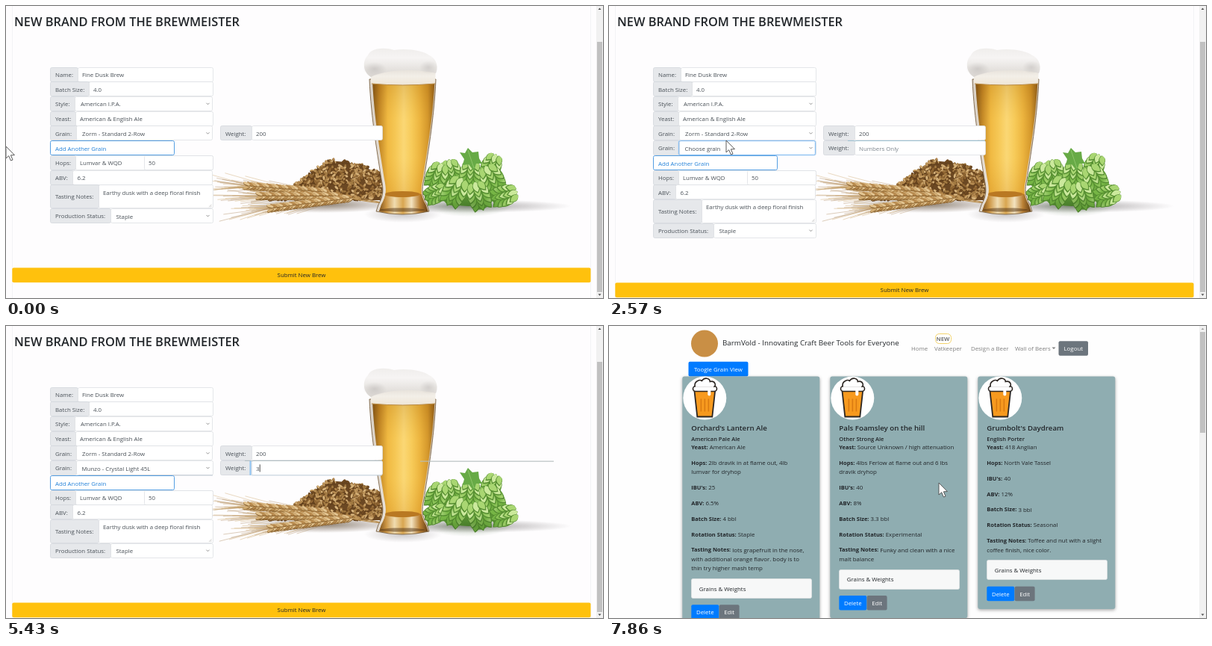
Animation, 800 px wide and 391 px high, one loop 8000 ms. Source, as an HTML page with a canvas:

```html
<!DOCTYPE html>
<html lang="en">
<head>
<meta charset="utf-8">
<title>Brew form</title>
<style>
html, body { margin: 0; width: 100%; height: 100%; overflow: hidden; background: #fff; }
canvas { display: block; width: 800px; height: 391px; }
</style>
</head>
<body>
<canvas id="stage"></canvas>
<script>
const W = 800, H = 391, LOOP = 8000, STEP = 1000 / 7;
const FONT = '"Open Sans", "Noto Sans", sans-serif';
const BODY = 7.85, ROW = 19.72;
const dpr = window.devicePixelRatio || 1;

function setup(canvas) {
  canvas.width = W * dpr;
  canvas.height = H * dpr;
  const c = canvas.getContext('2d');
  c.scale(dpr, dpr);
  return c;
}
const g = setup(document.getElementById('stage'));

// ---------- helpers ----------
function text(s, x, y, color = '#495057', size = BODY, weight = 400, align = 'left') {
  g.font = `${weight} ${size}px ${FONT}`;
  g.fillStyle = color;
  g.textAlign = align;
  g.fillText(s, x, y + size * 0.357);
  return g.measureText(s).width;
}

function box(x, y, w, h, fill, stroke, r = 2, line = 0.8) {
  if (stroke) {
    x = Math.floor(x) + 0.5;
    y = Math.floor(y) + 0.5;
    w = Math.round(w);
    h = Math.round(h);
  }
  g.beginPath();
  g.roundRect(x, y, w, h, r);
  if (fill) { g.fillStyle = fill; g.fill(); }
  if (stroke) { g.strokeStyle = stroke; g.lineWidth = line; g.stroke(); }
}

function rect(x, y, w, h, fill) {
  g.fillStyle = fill;
  g.fillRect(x, y, w, h);
}

function poly(c, points, fill, stroke, line = 1) {
  c.beginPath();
  points.forEach(([x, y]) => c.lineTo(x, y));
  c.closePath();
  if (fill) { c.fillStyle = fill; c.fill(); }
  if (stroke) { c.strokeStyle = stroke; c.lineWidth = line; c.stroke(); }
}

function oval(c, x, y, rx, ry, a, fill) {
  c.beginPath();
  c.ellipse(x, y, rx, ry, a, 0, Math.PI * 2);
  c.fillStyle = fill;
  c.fill();
}

function ramp(c, x0, y0, x1, y1, colors) {
  const grad = c.createLinearGradient(x0, y0, x1, y1);
  colors.forEach((col, i) => grad.addColorStop(i / (colors.length - 1), col));
  return grad;
}

function seeded(seed) {
  return () => (seed = (seed * 16807) % 2147483647) / 2147483647;
}

// ---------- background picture ----------
function softShadow(c, x, y, rx, ry, alpha, rgb = '80,75,75') {
  c.save();
  c.translate(x, y);
  c.scale(rx, ry);
  const grad = c.createRadialGradient(0, 0, 0, 0, 0, 1);
  grad.addColorStop(0, `rgba(${rgb},${alpha})`);
  grad.addColorStop(1, `rgba(${rgb},0)`);
  c.fillStyle = grad;
  c.fillRect(-1, -1, 2, 2);
  c.restore();
}

function pileTop(x) {
  const spread = x < 440 ? 50 : 95;
  return 255 - 49 * Math.exp(-(((x - 440) / spread) ** 2));
}

function drawPile(c, rnd) {
  const colors = ['#b58a50', '#8f6532', '#d6b27a', '#6f4a22', '#c39a5f', '#a27a42'];
  const hill = [[360, 260]];
  for (let x = 360; x <= 510; x += 6) hill.push([x, pileTop(x) + 2]);
  hill.push([510, 260]);
  poly(c, hill, '#6b4823');
  const grains = [];
  for (let i = 0; i < 700; i++) {
    const x = 352 + rnd() * 158, top = pileTop(x);
    grains.push([x, top + rnd() * (258 - top), rnd() * 3, colors[Math.floor(rnd() * 6)]]);
  }
  grains.sort((a, b) => a[1] - b[1]);
  for (const [x, y, a, col] of grains) {
    oval(c, x, y + 0.8, 3.3, 1.8, a, '#5f3e1c');
    oval(c, x, y, 3.1, 1.5, a, col);
  }
}

function drawEar(c, rnd, x1, y1, x2, y2) {
  const a = Math.atan2(y2 - y1, x2 - x1), n = 26;
  const colors = ['#d2ad74', '#b88a4e', '#e3c592'];
  const at = u => [x1 + (x2 - x1) * u, y1 + (y2 - y1) * u];
  c.strokeStyle = '#b98f52';
  c.lineWidth = 1.2;
  c.beginPath();
  c.moveTo(508, 264);
  c.quadraticCurveTo((x1 + 508) / 2, y1 + 6, x1, y1);
  c.stroke();
  c.lineWidth = 0.6;
  for (let i = 0; i < n * 2; i++) {
    const [x, y] = at(i / n / 2);
    const d = a + (rnd() - 0.5) * 0.4, len = 40 + rnd() * 35;
    c.strokeStyle = i % 2 ? 'rgba(205,166,106,.7)' : 'rgba(160,118,66,.6)';
    c.beginPath();
    c.moveTo(x, y);
    c.lineTo(x + Math.cos(d) * len, y + Math.sin(d) * len);
    c.stroke();
  }
  for (let i = 0; i < n; i++) {
    const [x, y] = at(i / n);
    for (const s of [-1, 1]) {
      const kx = x - Math.sin(a) * 2.5 * s, ky = y + Math.cos(a) * 2.5 * s;
      oval(c, kx, ky + 0.7, 5, 2.1, a + 0.4 * s, '#8c6532');
      oval(c, kx, ky, 4.8, 1.7, a + 0.4 * s, colors[(i + s + 3) % 3]);
    }
  }
}

function bract(c, x, y, w, h, a, fill) {
  c.save();
  c.translate(x, y);
  c.rotate(a);
  c.beginPath();
  c.moveTo(0, h);
  c.quadraticCurveTo(-w * 1.5, -h * 0.2, 0, -h);
  c.quadraticCurveTo(w * 1.5, -h * 0.2, 0, h);
  c.fillStyle = fill;
  c.fill();
  c.restore();
}

function drawCone(c, x, y, r, a) {
  c.save();
  c.translate(x, y);
  c.rotate(a);
  oval(c, 0, 0, r * 0.92, r * 1.05, 0, '#5f9a38');
  for (let j = 0; j < 5; j++) {
    const yy = (0.7 - j * 0.36) * r;
    const half = Math.sqrt(1 - (yy / r / 1.1) ** 2) * r * 0.62;
    for (let k = -1; k <= 1; k++) {
      const tilt = -k * 0.45;
      bract(c, k * half, yy, r * 0.4, r * 0.48, tilt, '#548c30');
      bract(c, k * half, yy - 0.8, r * 0.33, r * 0.42, tilt, ramp(c, 0, yy - r * 0.4, 0, yy + r * 0.4, ['#76b545', (j + k) % 2 ? '#a9d672' : '#cbe99c']));
    }
  }
  c.restore();
}

function drawHops(c) {
  oval(c, 620, 242, 48, 26, 0, '#5a9436');
  const cones = [[650, 215, 15, 0.4], [597, 223, 15, -0.2], [577, 228, 16, 0.4], [622, 226, 16, 0.1],
    [652, 232, 17, -0.5], [575, 252, 14, 1.1], [601, 249, 18, 0.5], [667, 254, 16, 1.3], [634, 255, 17, -0.3]];
  cones.forEach(p => drawCone(c, ...p));
  softShadow(c, 620, 268, 58, 14, 0.3, '30,70,15');
  poly(c, [[608, 196], [615, 197], [619, 190], [625, 196], [633, 195], [634, 204], [638, 211],
    [630, 211], [627, 221], [620, 212], [612, 213], [614, 205]], '#67aa46');
  c.strokeStyle = '#9bd077';
  c.lineWidth = 0.7;
  c.beginPath();
  c.moveTo(619, 193);
  c.lineTo(627, 217);
  c.stroke();
}

// inset moves the two sides inwards
function glassPath(c, left = 0, right = 0) {
  c.beginPath();
  c.moveTo(487 + left, 98);
  c.bezierCurveTo(489 + left, 150, 499 + left, 205, 503 + left, 232);
  c.bezierCurveTo(506 + left, 246, 506 + left, 254, 499 + left, 266);
  c.lineTo(496 + left, 275);
  c.quadraticCurveTo(531, 283, 567 - right, 275);
  c.lineTo(564 - right, 266);
  c.bezierCurveTo(557 - right, 254, 557 - right, 246, 560 - right, 232);
  c.bezierCurveTo(564 - right, 205, 574 - right, 150, 576 - right, 98);
  c.closePath();
}

function drawFoam(c) {
  c.beginPath();
  c.moveTo(489, 80);
  c.lineTo(576, 80);
  c.lineTo(575, 104);
  c.quadraticCurveTo(531, 108, 489, 104);
  c.closePath();
  c.fillStyle = ramp(c, 0, 82, 0, 106, ['#e2ddd6', '#f3efe8', '#eee5d6']);
  c.fill();
  c.beginPath();
  c.moveTo(489, 95);
  c.bezierCurveTo(477, 88, 478, 72, 485, 66);
  c.bezierCurveTo(489, 56, 507, 55, 520, 59);
  c.bezierCurveTo(537, 56, 560, 60, 567, 66);
  c.bezierCurveTo(579, 71, 579, 85, 576, 90);
  c.bezierCurveTo(550, 84, 510, 84, 489, 95);
  c.fillStyle = ramp(c, 0, 57, 0, 94, ['#f0eeec', '#f6f4f3', '#e9e6e3', '#d9d5d1']);
  c.fill();
  softShadow(c, 494, 84, 16, 9, 0.16);
  softShadow(c, 566, 82, 12, 9, 0.14);
}

function drawGlass(c) {
  glassPath(c);
  c.fillStyle = ramp(c, 487, 0, 576, 0, ['#d8cfc4', '#efe9e1', '#eee6da', '#cdbda8']);
  c.fill();
  c.save();
  glassPath(c, 4, 1.5);
  c.clip();
  c.fillStyle = ramp(c, 490, 0, 576, 0, ['#6e430f', '#bd7f1f', '#eeb53d', '#f5c654', '#fad777', '#f6c957', '#eab03a', '#cf8f24', '#7d4d12']);
  c.fillRect(480, 95, 100, 190);
  c.fillStyle = ramp(c, 0, 100, 0, 255, ['rgba(150,90,10,.22)', 'rgba(255,215,100,.12)', 'rgba(255,215,100,.12)', 'rgba(190,110,10,.2)']);
  c.fillRect(480, 95, 100, 160);
  c.fillStyle = ramp(c, 498, 0, 566, 0, ['#6b4418', '#cb9442', '#f0dcb0', '#d9a650', '#f3e3c0', '#ba8034', '#5f3b14']);
  c.fillRect(480, 252, 100, 32);
  oval(c, 531, 252, 24, 4, 0, '#b97822');
  oval(c, 531, 273, 30, 2.6, 0, 'rgba(80,50,20,.5)');
  c.restore();
  glassPath(c);
  c.strokeStyle = '#7b6245';
  c.lineWidth = 0.9;
  c.stroke();
  drawFoam(c);
  c.strokeStyle = '#b98a45';
  c.lineWidth = 1;
  c.beginPath();
  c.moveTo(490, 104);
  c.quadraticCurveTo(531, 108, 575, 104);
  c.stroke();
}

function makePicture() {
  const canvas = document.createElement('canvas');
  const c = setup(canvas), rnd = seeded(77);
  softShadow(c, 620, 268, 138, 9, 0.5);
  softShadow(c, 532, 279, 52, 11, 0.3);
  softShadow(c, 425, 266, 100, 11, 0.6, '70,48,25');
  drawPile(c, rnd);
  drawEar(c, rnd, 430, 249, 318, 240);
  drawEar(c, rnd, 445, 254, 335, 254);
  drawEar(c, rnd, 460, 257, 350, 271);
  drawHops(c);
  drawGlass(c);
  return canvas;
}
const picture = makePicture();

// ---------- pointers ----------
function arrow(x, y) {
  const pts = [[0, 0], [0, 16], [3.7, 12.7], [6.4, 19], [9, 18], [6.4, 11.8], [11.4, 11.6]];
  poly(g, pts.map(([a, b]) => [x + a, y + b]), '#fff', '#4a4a4a', 0.9);
}

function hand(x, y) {
  g.beginPath();
  g.moveTo(x - 1.8, y + 13);
  g.lineTo(x - 1.8, y + 1.5);
  g.quadraticCurveTo(x, y - 1, x + 1.8, y + 1.5);
  g.lineTo(x + 1.8, y + 7);
  g.quadraticCurveTo(x + 4, y + 5.5, x + 5, y + 8);
  g.quadraticCurveTo(x + 7, y + 6.5, x + 8, y + 9);
  g.quadraticCurveTo(x + 10, y + 8, x + 10, y + 11);
  g.lineTo(x + 9.6, y + 16);
  g.lineTo(x + 8, y + 21);
  g.lineTo(x, y + 21);
  g.lineTo(x - 5, y + 13.5);
  g.quadraticCurveTo(x - 5, y + 10, x - 1.8, y + 13);
  g.closePath();
  g.fillStyle = '#fff';
  g.fill();
  g.strokeStyle = '#222';
  g.lineWidth = 0.9;
  g.stroke();
}

function ibeam(x, y) {
  rect(x - 0.4, y - 7, 0.9, 14, '#333');
  rect(x - 2.5, y - 7, 5, 0.8, '#333');
  rect(x - 2.5, y + 6.5, 5, 0.8, '#333');
}

// time, x, y
const PATH = [[0, 0, 188], [860, 79, 190], [1290, 80, 190], [2150, 157, 180], [3569, 157, 180],
  [3570, 160, 266], [3710, 164, 273], [3990, 164, 273], [4430, 387, 207], [4850, 374, 190],
  [6270, 374, 190], [7000, 350, 376], [7420, 350, 376], [7860, 442, 210], [8000, 442, 210]];

function pointerAt(t) {
  const i = Math.max(1, PATH.findIndex(p => p[0] >= t));
  const [t0, x0, y0] = PATH[i - 1], [t1, x1, y1] = PATH[i];
  const u = (t - t0) / (t1 - t0), e = u * u * (3 - 2 * u);
  return [x0 + (x1 - x0) * e, y0 + (y1 - y0) * e];
}

// ---------- form page ----------
function label(x, y, w, s, h = 19.2) {
  box(x, y, w, h, '#e6e8eb', '#d3d7dc');
  text(s, x + 7, y + h / 2 + 0.4);
}

function input(x, y, w, s, color, h = 19.2) {
  box(x, y, w, h, '#fff', '#dde0e4');
  text(s, x + 6, y + 10.2, color);
}

function select(x, y, w, s) {
  box(x, y, w, 19.2, '#fff', '#dde0e4');
  text(s, x + 7.5, y + 10.2);
  g.strokeStyle = '#777';
  g.lineWidth = 0.8;
  g.beginPath();
  g.moveTo(x + w - 8, y + 8.4);
  g.lineTo(x + w - 6, y + 10.4);
  g.lineTo(x + w - 4, y + 8.4);
  g.stroke();
}

function field(y, name, w, draw, s) {
  label(59, y, w, name);
  draw(59 + w, y, 217.5 - w, s);
}

function scrollbar(top, bottom, atTop) {
  rect(791, 0, 9, H, '#f1f1f1');
  rect(792, top, 7, bottom - top, '#c1c1c1');
  poly(g, [[793.5, 5], [795.5, 2.5], [797.5, 5]], atTop ? '#a3a3a3' : '#505050');
  poly(g, [[793.5, 385.5], [795.5, 388], [797.5, 385.5]], '#505050');
}

function formPage(t, px, py) {
  const added = t >= 1280, picked = t >= 3420;
  const grainFocus = t >= 2280 && t < 4850, weightFocus = t >= 4850;
  const typed = t < 5280 ? '' : t < 5700 ? '3' : '35';

  rect(0, 0, W, H, '#fefdfe');
  rect(8, 0, 0.8, H, '#f0f0f3');
  rect(783.2, 0, 0.8, H, '#f0f0f3');
  text('NEW BRAND FROM THE BREWMEISTER', 11, 20.9, '#212529', 16.38, 600);
  g.drawImage(picture, 0, 0, W, H);
  if (weightFocus) rect(555, 180.6, 179, 1.1, '#b4bdbd');

  let y = 82;
  field(y, 'Name:', 37, input, 'Fine Dusk Brew');
  field(y += ROW, 'Batch Size:', 52, input, '4.0');
  field(y += ROW, 'Style:', 33.5, select, 'American I.P.A.');
  field(y += ROW, 'Yeast:', 34, input, 'American & English Ale');
  field(y += ROW, 'Grain:', 35.5, select, 'Zorm - Standard 2-Row');
  label(287, y, 42, 'Weight:');
  input(329, y, 175, '200');

  if (added) {
    field(y += ROW, 'Grain:', 35, select, picked ? 'Munzo - Crystal Light 45L' : 'Choose grain');
    label(287, y, 42, 'Weight:');
    input(329, y, 175, typed || 'Numbers Only', typed ? '#495057' : '#7c858d');
    rect(320, 180, 184, 1, weightFocus ? '#b3bfc3' : '#9fc3d3');
    if (grainFocus) {
      box(93, y, 183, 19.2, null, 'rgba(0,123,255,.14)', 2, 2.2);
      box(93, y, 183, 19.2, null, '#84bdf0', 2, 0.9);
    }
    if (weightFocus) {
      rect(97, 199.5, 180, 0.9, '#b3c0cb');
      rect(329, 199.5, 175, 0.9, '#c2d3df');
      rect(326.5, y, 2, 19.2, '#8fc3f2');
      const blink = t < 5700 || Math.floor((t - 5700) / 500) % 2 === 0;
      if (blink) {
        g.font = `400 ${BODY}px ${FONT}`;
        rect(335.3 + g.measureText(typed).width, y + 4.8, 0.8, 10, '#222');
      }
    }
  }

  y += ROW;
  const hot = !added && px > 59 && px < 226 && py > y && py < y + 19.5;
  box(59, y, 166, 19.2, hot ? '#007bff' : '#fff', hot ? '#007bff' : '#559fe2', 2, 1);
  text('Add Another Grain', 66, y + 10.4, hot ? '#fff' : '#1f7fd8');

  field(y += ROW, 'Hops:', 34, input, 'Lumvar & WQD');
  input(185, y, 91.5, '50');
  field(y += ROW, 'ABV:', 30.5, input, '6.2');
  y += ROW;
  label(59, y, 65, 'Tasting Notes:', 31);
  input(124, y, 152.5, 'Earthy dusk with a deep floral finish', undefined, 31);
  g.strokeStyle = '#aaa';
  g.lineWidth = 0.6;
  g.beginPath();
  g.moveTo(272, y + 29.5);
  g.lineTo(275.5, y + 26);
  g.moveTo(274, y + 29.5);
  g.lineTo(275.5, y + 28);
  g.stroke();
  field(y += 31.8, 'Production Status:', 81, select, 'Staple');

  const sy = added ? 370.4 : 350.4;
  const over = added && py > sy;
  box(8.3, sy, 775.2, 19.9, !over ? '#ffc10d' : t >= 7420 ? '#d39e00' : '#e0a80a', null, 2);
  text('Submit New Brew', 396, sy + 10.2, '#212529', BODY, 400, 'center');

  scrollbar(48, 383, false);
  if (t >= 5130 && t < 6270) return;
  if (hot || over) hand(px, py);
  else if (t > 4430 && t < 6500 && px > 329 && py < 200 && py > 162) ibeam(px, py);
  else arrow(px, py);
}

// ---------- list page ----------
const CARDS = [
  ["Orchard's Lantern Ale", 'American Pale Ale', ['Yeast: American Ale'],
    ['Hops: 2lb dravik in at flame out, 4lb', 'lumvar for dryhop'],
    ["IBU's: 25"], ['ABV: 6.5%'], ['Batch Size: 4 bbl'], ['Rotation Status: Staple'],
    ['Tasting Notes: lots grapefruit in the nose,', 'with additional orange flavor. body is to', 'thin try higher mash temp']],
  ['Pals Foamsley on the hill', 'Other Strong Ale', ['Yeast: Source Unknown / high attenuation'],
    ['Hops: 4lbs Ferlow at flame out and 6 lbs', 'dravik dryhop'],
    ["IBU's: 40"], ['ABV: 8%'], ['Batch Size: 3.3 bbl'], ['Rotation Status: Experimental'],
    ['Tasting Notes: Funky and clean with a nice', 'malt balance']],
  ["Grumbolt's Daydream", 'English Porter', ['Yeast: 418 Anglian'], ['Hops: North Vale Tassel'],
    ["IBU's: 40"], ['ABV: 12%'], ['Batch Size: 3 bbl'], ['Rotation Status: Seasonal'],
    ['Tasting Notes: Toffee and nut with a slight', 'coffee finish, nice color.']]
];
const INK = '#212529';

function pint(x, y) {
  oval(g, x, y, 29, 29, 0, '#fff');
  const dark = '#2c2622';
  poly(g, [[x - 14, y - 11], [x + 14, y - 11], [x + 10, y + 25], [x - 10, y + 25]], '#f79a1f', dark, 1.8);
  for (const d of [-5, 0, 5]) rect(x + d - 0.7, y + 1, 1.5, 17, '#d97a12');
  box(x - 16, y - 16, 32, 7, '#fff', dark, 3.5, 1.6);
  g.beginPath();
  g.moveTo(x - 13, y - 15);
  g.bezierCurveTo(x - 15, y - 23, x - 6, y - 25, x - 4, y - 23);
  g.bezierCurveTo(x, y - 29, x + 7, y - 26, x + 7, y - 22);
  g.bezierCurveTo(x + 14, y - 24, x + 16, y - 16, x + 12, y - 15);
  g.fillStyle = '#fff';
  g.fill();
  g.strokeStyle = dark;
  g.lineWidth = 1.6;
  g.stroke();
  box(x + 4, y - 12, 4, 9, '#fff', null, 2);
}

function button(x, y, w, s, fill) {
  box(x, y, w, 19.6, fill, null, 2);
  text(s, x + w / 2, y + 10, '#fff', BODY, 400, 'center');
}

function card(x, [title, kind, ...paras]) {
  let y = 162.3;
  const tx = x + 12;
  const lines = paras.reduce((n, p) => n + p.length - 1, 0);
  const boxY = y + 20.85 * 6 + 12.3 * lines + 14.2;
  g.save();
  g.shadowColor = 'rgba(0,0,0,.35)';
  g.shadowBlur = 4 * dpr;
  g.shadowOffsetY = 1.5 * dpr;
  box(x, 67.5, 184, boxY + 65 - 67.5, '#8fadb1', null, 3);
  g.restore();
  pint(x + 30, 96.5);
  text(title, tx, 137, INK, 9.7, 600);
  text(kind, tx, 151.3, INK, 7.5, 600);
  for (const p of paras) {
    const cut = p[0].indexOf(':') + 1;
    const w = text(p[0].slice(0, cut), tx, y, INK, 7.5, 700);
    text(p[0].slice(cut), tx + w, y, INK);
    p.slice(1).forEach(s => text(s, tx, y += 12.3, INK));
    y += 20.85;
  }
  box(tx, boxY, 161, 26, '#f7f8f8', '#dfe3e4', 2);
  text('Grains & Weights', tx + 10.5, boxY + 13.3, INK);
  button(tx, boxY + 34.8, 37, 'Delete', '#007bff');
  button(tx + 37.3, boxY + 34.8, 27, 'Edit', '#6c757d');
}

function listPage(px, py) {
  const grey = '#7f7f7f';
  rect(0, 0, W, H, '#fefefe');
  oval(g, 128, 23.5, 18, 18, 0, '#c98f45');
  text('BarmVold - Innovating Craft Beer Tools for Everyone', 152, 22.3, INK, 9.8);
  text('Home', 405, 30, grey);
  box(437, 10.5, 21, 12.5, '#fff', '#f3d36b', 5, 1);
  text('NEW', 447.5, 17, '#777', 7.6, 700, 'center');
  text('Vatkeeper', 436, 30, grey);
  text('Design a Beer', 485, 30, grey);
  text('Wall of Beers', 544, 30, grey);
  poly(g, [[593.5, 28.5], [598.5, 28.5], [596, 31]], grey);
  button(602.5, 20.2, 39.5, 'Logout', '#6c757d');
  button(106.5, 47.8, 80, 'Toogle Grain View', '#007bff');
  CARDS.forEach((data, i) => card(98.3 + i * 198, data));
  scrollbar(8, 143, true);
  arrow(px, py);
}

function frame(now) {
  const t = Math.floor(((now % LOOP) + 5) / STEP) * STEP % LOOP;
  const [px, py] = pointerAt(t);
  if (t < 7560) formPage(t, px, py);
  else listPage(px, py);
  requestAnimationFrame(frame);
}
requestAnimationFrame(frame);
</script>
</body>
</html>
```
